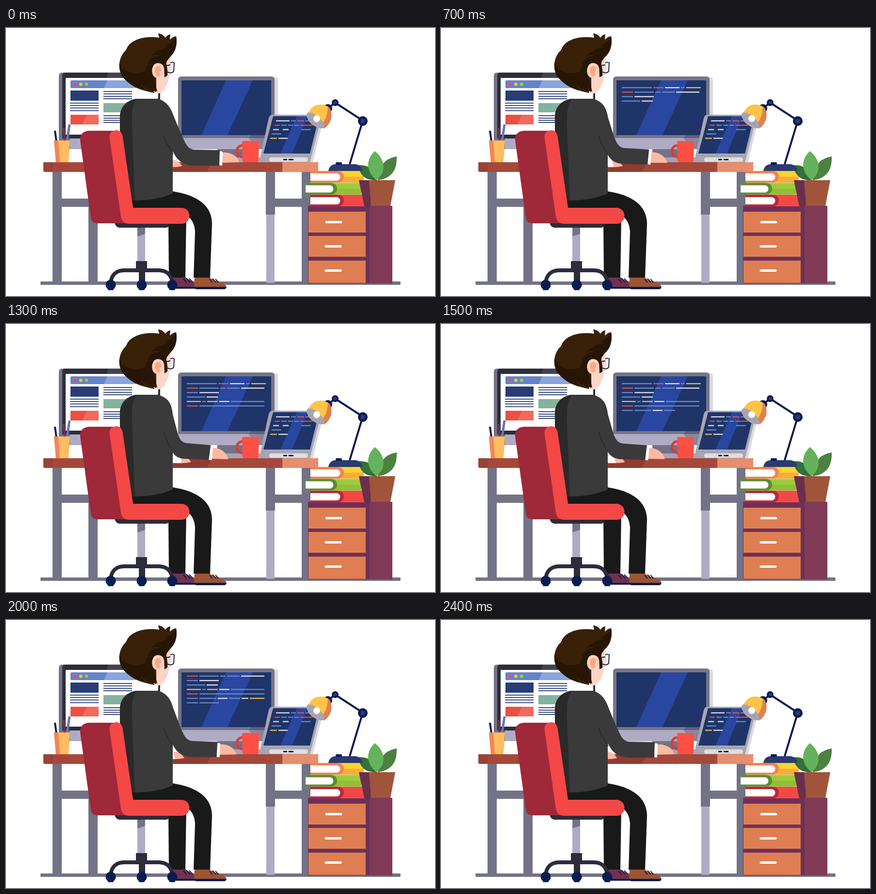
An HTML page that plays this animation: 885 px wide and 553 px high, repeating every 2.5 s.

```html
<!DOCTYPE html>
<html lang="en">
<head>
<meta charset="utf-8">
<title>Developer at a desk</title>
<style>
html, body { margin: 0; width: 100%; height: 100%; overflow: hidden; background: #fff; }
svg { display: block; width: 100vw; height: 100vh; }
.steel { fill: #737286; } .lilac { fill: #b0abc4; } .dark { fill: #2c2c3a; }
.navy { fill: #0a1c50; } .skin { fill: #fbbaa2; } .white { fill: #fff; }
.screen { fill: #1f3468; } .drawer { fill: #df7e52; }
</style>
</head>
<body>
<svg viewBox="0 0 885 553">
<defs>
  <clipPath id="screenClip"><path d="M362 109H547V221H362Z"/></clipPath>
  <clipPath id="headClip"><path d="M620 178L627 170C634 157 653 154 667 164C677 180 669 199 657 207C640 208 621 196 620 178Z"/></clipPath>
</defs>

<g id="leftMonitor">
  <path class="steel" d="M116 92H300V250H109V99Q109 92 116 92Z"/>
  <path class="lilac" d="M132 228H318V250H132Z"/>
  <path class="dark" d="M123 92H311Q318 92 318 99V228H116V99Q116 92 123 92Z"/>
  <path d="M211 92H311Q318 92 318 99V103H207Z" fill="#414153"/>
  <path class="white" d="M123 103H314V220H123Z"/>
  <rect x="133" y="108" width="140" height="16" rx="2" fill="#6484c8"/>
  <path d="M209 108H273V124H202Z" fill="#8aa5db"/>
  <circle cx="143" cy="116" r="3.5" fill="#ef5344"/>
  <circle cx="154.5" cy="116" r="3.5" fill="#fdc13c"/>
  <circle cx="166" cy="116" r="3.5" fill="#9ccc3c"/>
  <path d="M133 129H191V150H133Z" fill="#2a3c75"/>
  <path d="M133 179H191V199H133Z" fill="#ec5042"/>
  <path d="M167 179H191V199H157Z" fill="#f16a5c"/>
  <path d="M201 155H260V174H201Z" fill="#84b29f"/>
  <g id="pageLines" fill="#26396f"></g>
</g>

<g id="pencilCup">
  <path d="M101 212L104 234" stroke="#0a1c50" stroke-width="4"/>
  <path d="M119 206L121 234" stroke="#733451" stroke-width="4"/>
  <path d="M131 199L126 234" stroke="#6577b3" stroke-width="5"/>
  <path d="M99 232H132L129 277H103Z" fill="#fdbd60"/>
  <path d="M99 232H108L111 277H103Z" fill="#f58557"/>
</g>

<g id="mainMonitor">
  <path class="steel" d="M436 250H520V277H436Z"/>
  <path d="M455 267H525V277H412Q414 267 422 267Z" fill="#a5a2b7"/>
  <path d="M530 101H555Q561 102 561 108V235H530Z" fill="#dadae0"/>
  <path class="lilac" d="M355 226H554V244Q554 250 548 250H361Q355 250 355 244Z"/>
  <path d="M362 100H547Q554 100 554 107V227H355V107Q355 100 362 100Z" fill="#757684"/>
  <path class="screen" d="M362 108H547V221H362Z"/>
  <path d="M454 108H509L457 221H403Z" fill="#2947a0"/>
  <g id="code" clip-path="url(#screenClip)"></g>
  <path d="M547 183L500 227L523 250H530Z" fill="#29304f" opacity=".3"/>
</g>

<g id="tablet">
  <path d="M549 179H649Q657 180 655 188L633 277H522Z" fill="#d8d8df"/>
  <path d="M549 179H644Q652 180 650 187L627 277H522L542 186Q544 179 549 179Z" fill="#a5a5b3"/>
  <path class="screen" d="M551 182H646L627 259H531Z"/>
  <path d="M600 182H622L590 259H566Z" fill="#2947a0"/>
  <rect x="543" y="267" width="80" height="9" rx="4" fill="#dddde2"/>
  <path class="navy" d="M572 270H580V273H572ZM583 270H593V273H583Z"/>
  <g id="tabletCode"></g>
</g>

<g id="desk">
  <path class="steel" d="M96 297H115V527H96ZM115 352H170V369H115ZM170 297H189V527H170ZM536 297H555V385H536ZM555 352H611V369H555ZM610 297H629V527H610Z"/>
  <rect class="steel" x="71" y="523" width="743" height="7" rx="2"/>
  <path class="lilac" d="M537 385H554V526H537Z"/>
  <path d="M77 277H644V297H81Q77 297 77 293Z" fill="#a5483a"/>
  <path d="M77 277H97V297H81Q77 297 77 293Z" fill="#9b4236"/>
  <path d="M345 277H426L414 297H345Z" fill="#8f3b32"/>
  <path d="M570 277H640Q644 277 644 281V297H570Z" fill="#e68e6d"/>
</g>

<g id="cup">
  <path d="M491 243C472 239 471 268 491 266" fill="none" stroke="#d43c3d" stroke-width="5"/>
  <path d="M487 236Q487 233 491 233H518Q522 233 522 237L521 274Q521 277 517 277H492Q488 277 488 273Z" fill="#fd4f44"/>
</g>

<g id="cabinet">
  <path d="M623 367H797V527H623Z" fill="#6f3057"/>
  <path d="M750 367H794Q797 367 797 371V526H750Z" fill="#803a56"/>
  <path class="drawer" d="M624 379H742V422H624ZM624 429H742V472H624ZM624 480H742V526H624Z"/>
  <path d="M661 400.5H691M660 450.5H690M660 500.5H690" stroke="#fff" stroke-width="5" stroke-linecap="round"/>
</g>
<g id="books"></g>

<g id="plant">
  <path d="M765 314C740 315 729 303 728 283C750 282 761 294 765 314Z" fill="#33703b"/>
  <path d="M767 314C768 284 782 269 806 265C807 293 796 310 767 314Z" fill="#4d8140"/>
  <path d="M764 314C741 295 743 270 761 254C785 273 783 300 764 314Z" fill="#64b35c"/>
  <path d="M728 314H803L793 367H739Z" fill="#a0543a"/>
  <path d="M728 314H749L753 367H739Z" fill="#68304c"/>
</g>

<g id="lamp">
  <path d="M665 295Q667 282 680 281H722Q733 283 735 295Z" fill="#2b3a70"/>
  <rect class="navy" x="680" y="277" width="13" height="5" rx="2"/>
  <path d="M709 281L736 191L679 154L664 166" fill="none" stroke="#0a1650" stroke-width="4"/>
  <circle class="navy" cx="736" cy="192" r="10"/><circle cx="736" cy="192" r="5" fill="#2b3a70"/>
  <circle class="navy" cx="679" cy="154" r="7"/><circle cx="679" cy="154" r="3.5" fill="#2b3a70"/>
  <circle class="navy" cx="664" cy="166" r="9"/>
  <g clip-path="url(#headClip)">
    <path d="M610 150H680V212H610Z" fill="#fdc447"/>
    <path d="M664 155L680 160V212H645L655 193C661 185 664 175 664 155Z" fill="#df8052"/>
    <path d="M618 174H626Q647 178 657 201V212H615Z" fill="#a6a4b2"/>
  </g>
  <circle class="white" cx="641" cy="187" r="7"/>
</g>

<g id="shoes">
  <path d="M342 514H369L389 526V537H339Z" fill="#713151"/>
  <path class="navy" d="M339 534H389V538H341Z"/>
  <path d="M389 515H421C432 526 452 522 455 535H388Z" fill="#9c5533"/>
  <path class="navy" d="M388 534H455Q454 539 450 539H392Q388 538 388 534Z"/>
  <path d="M366 518L373 525M372 516L380 525M378 517L386 525M420 518L426 525M426 517L433 525M432 518L438 525" stroke="#1b1d47" stroke-width="2"/>
</g>
<path id="trousers" d="M258 350L344 337C394 345 424 365 425 403L421 515H387L390 420C388 400 382 393 372 388L370 515H336L335 400H258Z" fill="#191919"/>

<g id="man">
  <g id="farHand">
    <path class="skin" d="M334 272H346C358 271 365 277 369 285Q355 288 334 287Z"/>
    <path class="white" d="M326 255L343 258L350 287H326Z"/>
  </g>
  <path d="M268 146H316C333 155 342 172 344 186V341Q310 357 256 356L235 225V180C237 163 247 150 268 146Z" fill="#3a3a3a"/>
  <path d="M270 146C260 160 259 180 260 205L266 356H250L235 225V180C237 163 247 150 270 146Z" fill="#2a2a2a"/>
  <path id="hand" class="skin"/>
  <path id="cuff" class="white"/>
  <path id="sleeve" fill="#3a3a3a"/>
  <path id="crease" fill="none" stroke="#292929" stroke-width="1.5"/>
  <path class="white" d="M271 133H314V146H265Z"/>
  <path d="M303 50H337C341 70 343 86 337 99C333 118 326 132 316 135L303 133Z" fill="#fdd5c8"/>
  <path d="M248 45C254 25 284 15 316 20L314 11Q323 12 329 20Q333 14 339 13L338 24Q345 17 351 17C354 36 349 50 338 60L332 68L328 82L318 85L310 100V132L300 128L306 134C290 131 269 126 257 116C242 105 232 92 234 72Q236 56 248 45Z" fill="#382009"/>
  <path d="M351 17C354 36 349 50 338 60L330 71Q334 86 333 98L327 102L326 76C313 68 303 76 302 92L312 131Q305 128 301 119L306 134Q296 128 290 116L294 127Q281 120 274 110L284 126Q268 124 257 116C240 104 232 92 234 72C240 90 265 99 289 89C291 68 300 58 318 57C308 54 305 56 299 59C313 42 330 44 336 36L325 38Q346 30 351 17Z" fill="#271505"/>
  <path d="M318 73C305 69 299 83 302 94C305 105 317 106 323 96C328 87 327 76 318 73Z" fill="#fdd0bd"/>
  <path d="M319 79C309 76 305 85 308 93C309 101 317 103 319 96Q314 92 321 87Z" fill="#f9aa89"/>
  <path d="M339 72Q343 69 347 72L346 89Q343 94 337 92Z" fill="#e4e7f2" opacity=".7"/>
  <path d="M328 78L339 76M339 72Q343 69 347 72L346 89Q343 94 337 92L330 90" fill="none" stroke="#20233a" stroke-width="2"/>
</g>

<g id="chair">
  <path class="dark" d="M224 402H336V407Q335 412 330 412H234Q226 411 224 402Z"/>
  <path class="lilac" d="M271 412H287V482H271Z"/>
  <path class="steel" d="M271 412H287V425L271 430Z"/>
  <path d="M216 527C217 509 228 500 244 500H315C331 500 342 509 343 527M280 498V526" fill="none" stroke="#2c2c3a" stroke-width="8"/>
  <path class="dark" d="M268 481H291V504H268ZM274 500H287V527H274Z"/>
  <g id="wheels" class="navy"></g>
  <path d="M153 232C152 219 160 212 173 212H230L258 403H188Q177 403 175 392Z" fill="#9f2839"/>
  <path d="M214 229C212 216 219 211 229 211Q239 212 241 226L262 371H362A16 16 0 0 1 362 404H253Q239 403 237 389Z" fill="#f34846"/>
</g>
</svg>

<script>
const LOOP = 2500, STEP = 100, SWING = 2400;
const NS = "http://www.w3.org/2000/svg";
const COLORS = { b: "#6f8bcd", r: "#ea5148", y: "#f7c04a", w: "#e9e8ee" };
const $ = id => document.getElementById(id);

function add(parent, tag, attrs) {
  const node = document.createElementNS(NS, tag);
  for (const key in attrs) node.setAttribute(key, attrs[key]);
  return parent.appendChild(node);
}
const bar = (parent, x, y, width, fill) =>
  add(parent, "rect", { x, y: y - 1, width, height: 2.2, fill });

// Rows are colour letter plus length ("-" is a blank); bars sit three pixels apart.
function layRow(parent, text, x, y) {
  const left = x;
  return text.split(" ").map(part => {
    const width = +part.slice(1);
    const node = bar(parent, x, y, width, COLORS[part[0]] || "none");
    const segment = { node, width, start: x - left };
    x += width + 3;
    return segment;
  });
}

for (const [x, tops] of [[132, [155, 160, 165, 170.5]], [201, [131, 136, 141, 146, 181, 186, 190.5, 195]]])
  for (const y of tops)
    add($("pageLines"), "rect", { x, y: y - 0.9, width: 59, height: 1.8 });

["w28 b10 r14 b14", "r11 b11 b10 b9 r25", "w12 -2 w12 -20 b20", "b20", "y14 w19"]
  .forEach((row, i) => layRow($("tabletCode"), row, 557 - 3 * i, 191.5 + 9 * i));

function book(x, y, fold, end, cover, spine, shade) {
  const g = $("books");
  add(g, "path", { d: `M${x} ${y}H${end}V${y + 24}H${x}Z`, fill: spine });
  add(g, "path", { d: `M${fold - 4} ${y + 12}H${end}V${y + 24}H${fold - 14}Z`, fill: shade });
  add(g, "path", { d: `M${x} ${y}H${fold - 12}a12 12 0 0 1 0 24H${x}Z`, fill: cover });
  add(g, "path", { d: `M${x} ${y + 5}H${fold - 15}a7 7 0 0 1 0 15H${x}Z`, fill: "#fff" });
}
book(628, 295, 697, 738, "#f5824f", "#fdd231", "#faab39");
book(618, 319.5, 683, 733, "#568f2f", "#9ccc3c", "#91c038");
book(628, 344, 697, 739, "#bd273c", "#f34846", "#f34846");

for (const x of [216, 280, 343]) {
  add($("wheels"), "circle", { cx: x, cy: 530, r: 10.5 });
  add($("wheels"), "rect", { x: x - 6, y: 535, width: 12, height: 6, rx: 2 });
}

let total = 0;
const rows = [
  "b62 r21 w30 b8 y30", "r23 b40 b11 b26 w48", "b23 w40", "b38 w23",
  "y29 b7 y22 w21 b69", "r23 b134", "b23 b35 w20 b23 w14 y30", "b23 b40"
].map((text, i) => {
  const segments = layRow($("code"), text, 373, 123 + 9.2 * i);
  const last = segments[segments.length - 1];
  const row = { segments, offset: total };
  total += last.start + last.width;
  return row;
});

const clamp = (v, lo, hi) => Math.min(hi, Math.max(lo, v));
const ease = u => (1 - Math.cos(2 * Math.PI * u)) / 2;

// Blends the numbers of two paths that share their commands.
function blend(a, b, p) {
  const goal = b.match(/-?[\d.]+/g);
  let i = 0;
  return a.replace(/-?[\d.]+/g, n => (+n + (goal[i++] - n) * p).toFixed(2));
}

const POSES = {
  sleeve: [
    "M316 147C332 152 340 165 346 182L361 218C370 237 374 250 388 251L441 252L440 284L388 284C362 283 352 270 345 256L326 228L310 160Z",
    "M316 147C336 153 342 165 344 187L354 225C358 238 362 245 375 246L422 250L418 280L366 278C350 276 344 268 338 254L326 228L310 160Z"],
  crease: ["M326 222L329 234L345 260", "M326 222L329 234L340 259"],
  cuff: ["M440 254L447 255L446 284L439 283Z", "M421 251L427 252L424 281L417 280Z"],
  hand: [
    "M445 257C465 255 479 266 481 277L445 278Z",
    "M425 256C442 254 456 267 458 279L423 278Z"]
};

// Each pair is a time and the number of rows finished by then.
const TYPING = [[0, 0], [300, 1], [700, 4], [1300, 6], [1700, 8]]
  .map(([time, count]) => [time, count < rows.length ? rows[count].offset : total]);

function typedLength(t) {
  for (let i = 1; i < TYPING.length; i++) {
    const [t0, n0] = TYPING[i - 1], [t1, n1] = TYPING[i];
    if (t <= t1) return n0 + (n1 - n0) * (t - t0) / (t1 - t0);
  }
  return total;
}

function draw(time) {
  const t = Math.floor((time % LOOP) / STEP) * STEP;
  const pull = ease(t / SWING);
  for (const id in POSES) $(id).setAttribute("d", blend(...POSES[id], pull));
  $("farHand").setAttribute("transform", `translate(${-6 + 19 * pull} 0)`);

  const typed = typedLength(t);
  for (const { segments, offset } of rows)
    for (const { node, start, width } of segments)
      node.setAttribute("width", clamp(typed - offset - start, 0, width));
  const scroll = 16.6 * (Math.max(0, t - 1750) / 250) ** 2;
  for (const node of $("code").children) node.setAttribute("transform", `translate(0 ${-scroll})`);
}

const begin = performance.now();
function tick() {
  draw(performance.now() - begin);
  requestAnimationFrame(tick);
}
tick();
</script>
</body>
</html>
```
